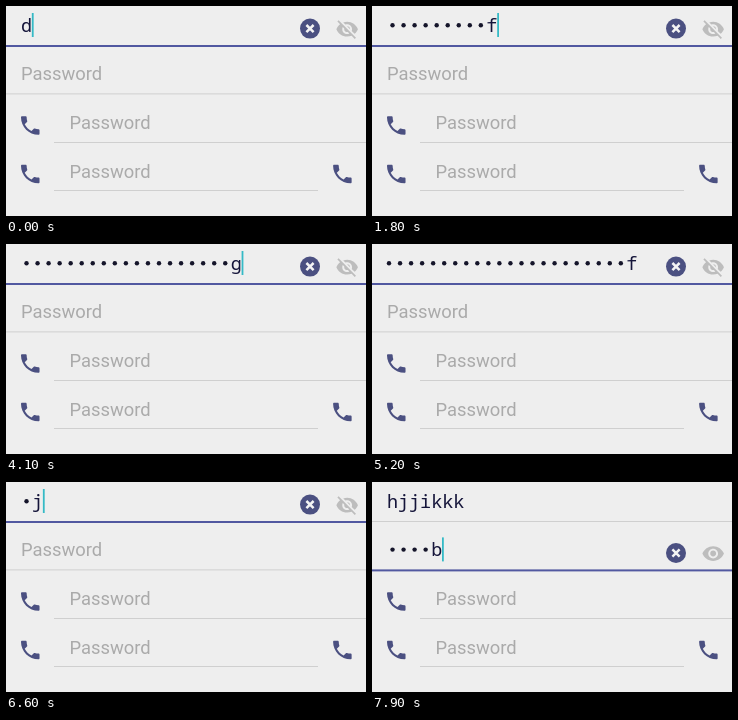
An HTML page that plays this animation: 360x210 px, repeating every 8 s.

```html
<!DOCTYPE html>
<html>
<head>
<meta charset="utf-8">
<style>
html, body { margin: 0; width: 100%; height: 100%; overflow: hidden; background: #eee; }
svg { display: block; }
.hint { font: 18.4px Roboto, sans-serif; fill: #aaa; }
.typed { font: 18.4px "Noto Sans Mono", "DejaVu Sans Mono", monospace; fill: #15153a; }
.dot { fill: #15152a; }
.icon { fill: #4b5081; }
.eye { fill: #bdbdbd; }
.line { fill: #cfcfcf; }
.focus { fill: #5158a0; }
.cursor { fill: #35bac6; }
</style>
</head>
<body>
<svg width="360" height="210" viewBox="0 0 360 210">
  <defs>
    <path id="phone" class="icon" transform="scale(1.03)" d="M6.62 10.79c1.44 2.83 3.76 5.14 6.59 6.59l2.2-2.2c.27-.27.67-.36 1.02-.24 1.12.37 2.33.57 3.57.57.55 0 1 .45 1 1V20c0 .55-.45 1-1 1-9.39 0-17-7.61-17-17 0-.55.45-1 1-1h3.5c.55 0 1 .45 1 1 0 1.25.2 2.45.57 3.57.11.35.03.74-.25 1.02l-2.2 2.2z"/>
    <path id="open" class="eye" transform="scale(.98)" d="M12 4.5C7 4.5 2.73 7.61 1 12c1.73 4.39 6 7.5 11 7.5s9.27-3.11 11-7.5c-1.73-4.39-6-7.5-11-7.5zM12 17c-2.76 0-5-2.24-5-5s2.24-5 5-5 5 2.24 5 5-2.24 5-5 5zm0-8c-1.66 0-3 1.34-3 3s1.34 3 3 3 3-1.34 3-3-1.34-3-3-3z"/>
    <path id="shut" class="eye" transform="scale(.98)" d="M12 7c2.76 0 5 2.24 5 5 0 .65-.13 1.26-.36 1.83l2.92 2.92c1.51-1.26 2.7-2.89 3.43-4.75-1.73-4.39-6-7.5-11-7.5-1.4 0-2.74.25-3.98.7l2.16 2.16C10.74 7.13 11.35 7 12 7zM2 4.27l2.28 2.28.46.46C3.08 8.3 1.78 10.02 1 12c1.73 4.39 6 7.5 11 7.5 1.55 0 3.03-.3 4.38-.84l.42.42L19.73 22 21 20.73 3.27 3 2 4.27zM7.53 9.8l1.55 1.55c-.05.21-.08.43-.08.65 0 1.66 1.34 3 3 3 .22 0 .44-.03.65-.08l1.55 1.55c-.67.33-1.41.53-2.2.53-2.76 0-5-2.24-5-5 0-.79.2-1.53.53-2.2zm4.31-.78l3.15 3.15.02-.16c0-1.66-1.34-3-3-3l-.17.01z"/>
    <g id="clear">
      <circle class="icon" r="10"/>
      <path d="M-3.6-3.6L3.6 3.6M3.6-3.6L-3.6 3.6" stroke="#f4f4f4" stroke-width="2.5"/>
    </g>
    <clipPath id="field"><rect x="14" width="252" height="210"/></clipPath>
  </defs>
  <g id="rows"></g>
  <use href="#phone" x="0" y="0" transform="translate(11.9 107.2)"/>
  <use href="#phone" transform="translate(11.9 155.6)"/>
  <use href="#phone" transform="translate(324 155.6)"/>
  <text class="hint" x="63.5" y="123">Password</text>
  <text class="hint" x="63.5" y="171.5">Password</text>
  <rect class="line" x="48" y="136" width="312" height="1"/>
  <rect class="line" x="48" y="184" width="264" height="1"/>
</svg>
<script>
const LOOP = 8000, CELL = 11.04, LEFT = 15, RIGHT = 265.4;
const CLEARED = 5700, SHOWN = 7300, SWITCHED = 7400;
const rows = document.getElementById('rows');

// Each burst of typing: its text and the time at which key i is pressed.
const first = { text: 'dfghfdghgfghjgdfdgfghdf', key: i => 200 * i + 40 * Math.max(0, i - 15) };
const second = { text: 'hjjikkk', key: i => 6300 + 160 * i };
const third = { text: 'hjgvb', key: i => 7480 + 90 * i };

function typed({ text, key }, t, start) {
  let n = 0;
  while (n < text.length && key(n) <= t) n++;
  return { text: text.slice(0, n), last: n ? key(n - 1) : start };
}

const use = (id, x, y) => `<use href="#${id}" transform="translate(${x} ${y})"/>`;
const rect = (name, x, y, w, h) => `<rect class="${name}" x="${x}" y="${y}" width="${w}" height="${h}"/>`;
const label = (name, x, y, s) => `<text class="${name}" x="${x}" y="${y}">${s}</text>`;

function row(y, { text, last }, t, focused, plain, eye) {
  const n = text.length;
  const x = LEFT - Math.max(0, LEFT + n * CELL - RIGHT);
  let out = '';
  if (!n) out += label('hint', LEFT, y + 26, 'Password');
  else if (plain) out += label('typed', x, y + 26, text);
  else {
    for (let i = 0; i < n - 1; i++)
      out += `<circle class="dot" cx="${x + (i + .5) * CELL}" cy="${y + 19.2}" r="2.2"/>`;
    out += label('typed', x + (n - 1) * CELL, y + 26, text[n - 1]);
  }
  if (focused && (t - last) % 1000 < 500)
    out += rect('cursor', x + n * CELL - .2, y + 7, 1.8, 24);
  out = `<g clip-path="url(#field)">${out}</g>`;
  if (!focused) return out + rect('line', 0, y + 39, 360, 1);
  if (n) out += use('clear', 304, y + 22.6);
  return out + use(eye, 329.4, y + 11.4) + rect('focus', 0, y + 39, 360, 2);
}

function draw(now) {
  const t = now % LOOP;
  const top = t < CLEARED ? typed(first, t, 0) : typed(second, t, CLEARED);
  const onTop = t < SWITCHED, plain = t >= SHOWN;
  rows.innerHTML =
    row(0, top, t, onTop, plain, plain ? 'open' : 'shut') +
    row(48.4, typed(third, t, SWITCHED), t, !onTop, false, 'open');
  requestAnimationFrame(() => draw(performance.now()));
}
draw(0);
</script>
</body>
</html>
```
